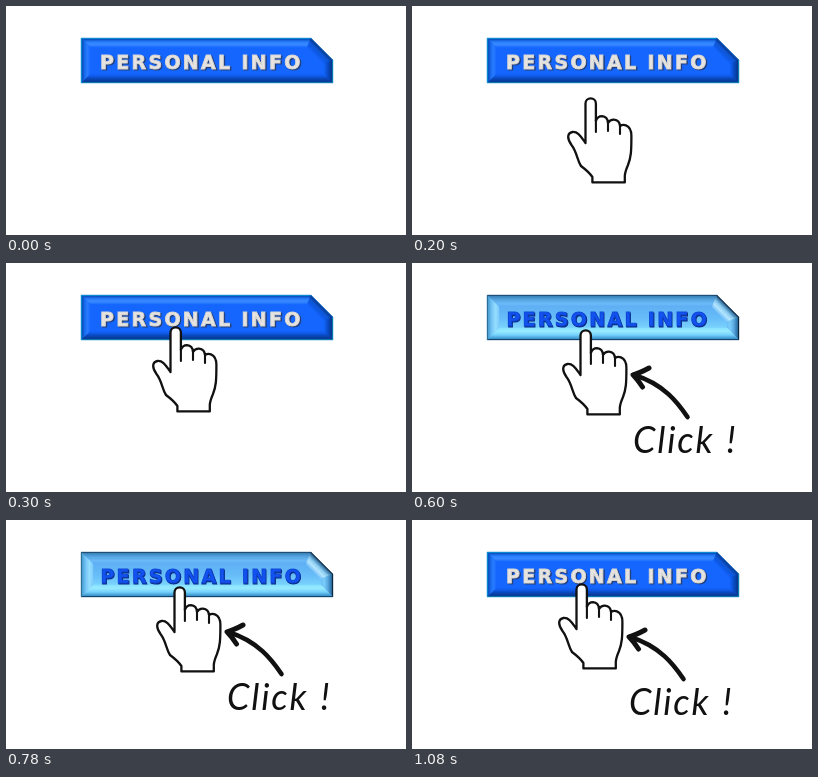
Write an HTML page that moves like this. It is 400 px wide and 229 px high and loops after 1200 ms.

```html
<!DOCTYPE html>
<html lang="en">
<head>
<meta charset="utf-8">
<title>Personal info button</title>
<style>
  html, body { margin: 0; width: 100%; height: 100%; overflow: hidden; background: #fff; }
  svg { display: block; width: 100%; height: 100%; }
  .label { font: bold 19px "DejaVu Sans", sans-serif; letter-spacing: 2.3px; }
  .note { font: italic 36px Lato, sans-serif; letter-spacing: 1.8px; }
  .ink { fill: none; stroke: #111; stroke-linecap: round; stroke-linejoin: round; }
</style>
</head>
<body>
<svg viewBox="0 0 400 229">
  <linearGradient id="sky" gradientUnits="userSpaceOnUse" x1="0" y1="40" x2="0" y2="70">
    <stop stop-color="#5cacf2"/>
    <stop offset=".5" stop-color="#66bcf8"/>
    <stop offset="1" stop-color="#84deff"/>
  </linearGradient>
  <g id="idle">
    <g class="bevel"></g>
    <g class="label">
      <text x="95.2" y="64" fill="#24407c" stroke="#24407c" stroke-width="1.2">PERSONAL INFO</text>
      <text x="94" y="63" fill="#e6e4e0" stroke="#d8d6d2" stroke-width=".9">PERSONAL INFO</text>
    </g>
  </g>
  <g id="pressed">
    <g class="bevel"></g>
    <g class="label">
      <text x="95" y="63.6" fill="#0a2c80" stroke="#0a2c80" stroke-width="1.2">PERSONAL INFO</text>
      <text x="94.4" y="63" fill="#1252ee" stroke="#1046d8" stroke-width=".8">PERSONAL INFO</text>
    </g>
  </g>
  <g id="hand">
    <path class="ink" style="fill:#fff" stroke-width="2.3" d="M164.5 108V69.5a5.2 5.2 0 0 1 10.4 0V87
      Q176.5 82.2 181 82.2 Q186.6 82.6 187 89 Q189 85.4 193 85.6 Q198.6 86.2 199 92
      Q202 90 205 91.4 Q210.4 93.6 210.4 102 C210.4 118 210 123 207 131 Q204 138 203.8 142
      V148.4H171.4V143 Q168 138 160 132 C156 126 156 118 150.5 111
      C145.5 104 146.5 99 151.5 98 C157.5 97.5 160 103 164.5 109"/>
    <path class="ink" stroke-width="2.1" d="M174.9 86V98M187 88V97M199 91V100"/>
  </g>
  <g id="hint">
    <path class="ink" stroke-width="4.6" d="M271.5 159C262 145 248 126 218 117"/>
    <path class="ink" stroke-width="5" d="M233 110Q224 115 217 116.8Q222 122 226.5 129"/>
    <g class="note" fill="#111">
      <text x="217" y="195">Click</text>
      <text x="310.5" y="195">!</text>
    </g>
  </g>
</svg>
<script>
const NS = 'http://www.w3.org/2000/svg';
const $ = id => document.getElementById(id);

// Button outline, moved inwards by d.
const outline = d => [
  [75 + d, 32 + d], [305 - .41 * d, 32 + d], [327 - d, 54 + .41 * d],
  [327 - d, 77 - d], [75 + d, 77 - d]
];

function polygon(parent, points, fill) {
  const el = document.createElementNS(NS, 'polygon');
  el.setAttribute('points', points.join(' '));
  el.style.fill = el.style.stroke = fill;
  el.style.strokeWidth = .3;
  parent.append(el);
}

// Blend along a list of evenly spaced colours.
function shade(stops, t) {
  const x = t * (stops.length - 1), i = Math.min(Math.floor(x), stops.length - 2);
  return `color-mix(in srgb, ${stops[i]}, ${stops[i + 1]} ${(x - i) * 100}%)`;
}

// Sides run clockwise from the top; each goes inwards from the rim.
function bevel(id, depth, face, rim, sides) {
  const parent = $(id).querySelector('.bevel');
  polygon(parent, outline(.2), face);
  for (let d = 0; d < depth; d++) {
    const a = outline(d), b = outline(d + 1);
    sides.forEach((stops, i) => {
      const j = (i + 1) % 5;
      const fill = d ? shade(stops, (d - 1) / (depth - 1)) : rim[i];
      polygon(parent, [a[i], a[j], b[j], b[i]], fill);
    });
  }
}

const blue = '#1566ff';
bevel('idle', 9, blue, ['#0c93d0', '#0c5aa8', '#0c88b8', '#0c84b4', '#0c93d0'], [
  ['#0b50c4', '#2a80ff', '#3a8aff', blue],
  ['#0a3a94', '#1058d4', '#1058e0', blue],
  ['#08388c', '#0a48b8', '#0e56dc', blue],
  ['#083a94', '#0a46b4', '#1058e4', blue],
  ['#0b52c0', '#1c70f0', '#2b7cff', blue]
]);
bevel('pressed', 12, 'url(#sky)', ['#1c4468', '#0b1c30', '#0b1c30', '#10365c', '#2c688e'], [
  ['#3c84bc', '#58a8e4', '#6cb8f4', '#5cacf2'],
  ['#2c6490', '#8cccf0', '#c0ecff', '#70bcf8'],
  ['#2c6ca0', '#58a8e0', '#7cccf8', '#6cc0f8'],
  ['#3c94cc', '#74d0fa', '#98ecff', '#84deff'],
  ['#4ca0d4', '#78c8f8', '#98deff', '#78c8fa']
]);

// Each row is [time in ms, value]; values hold until the next row.
const LOOP = 1200;
function play(id, prop, rows) {
  const frames = [...rows, [LOOP, rows.at(-1)[1]]].map(([t, v]) =>
    ({ offset: t / LOOP, [prop]: v, easing: 'steps(1, end)' }));
  $(id).animate(frames, { duration: LOOP, iterations: Infinity });
}
const move = (x, y) => `translate(${x}px, ${y}px)`;

play('idle', 'opacity', [[0, 1], [600, 0], [900, 1]]);
play('pressed', 'opacity', [[0, 0], [600, 1], [900, 0]]);
play('hand', 'opacity', [[0, 0], [100, 1]]);
play('hand', 'transform', [
  [0, move(48, 105)], [200, move(9, 28)], [300, move(0, 0)],
  [600, move(4, 3)], [900, move(0, 0)]
]);
play('hint', 'opacity', [[0, 0], [600, 1]]);
play('hint', 'transform', [[0, move(4, -5)], [900, move(0, 0)]]);
</script>
</body>
</html>
```
